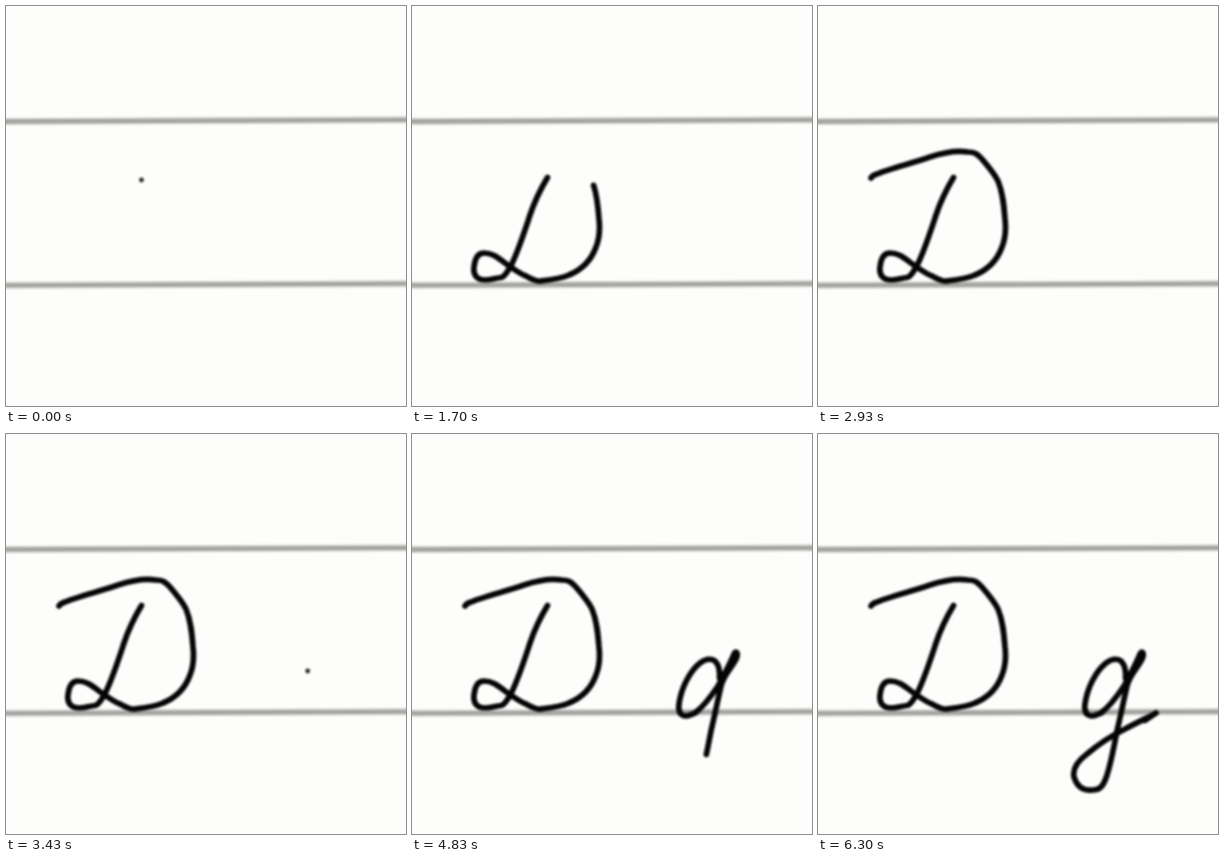
Recreate the animation shown at these times as an HTML page. Size 400 px wide and 400 px high, loop 6330 ms.

```html
<!DOCTYPE html>
<html lang="en">
<head>
<meta charset="utf-8">
<title>Handwriting</title>
<style>
  html, body { margin: 0; width: 100%; height: 100%; overflow: hidden; background: #fdfdfc; }
  svg { display: block; width: 100vw; height: 100vh; }
  path { fill: none; stroke-linecap: round; stroke-linejoin: round; }
  #inks, #rules { filter: blur(.8px); }
  .ink { stroke: #050506; stroke-width: 5.7; }
  .edge { stroke: #d8d8d6; stroke-width: 7; }
  .rule { stroke: #a5a4a1; stroke-width: 4.4; }
</style>
</head>
<body>
<svg viewBox="0 0 400 400">
  <g id="rules"></g>
  <g id="inks"></g>
</svg>
<script>
const LOOP = 6330;
const DOT_TIME = 70;
const $ = id => document.getElementById(id);

function add(parent, tag, attrs) {
  const el = document.createElementNS('http://www.w3.org/2000/svg', tag);
  for (const name in attrs) el.setAttribute(name, attrs[name]);
  parent.appendChild(el);
  return el;
}

for (const y of [115.6, 279.4])
  for (const cls of ['edge', 'rule'])
    add($('rules'), 'path', { class: cls, d: `M-10 ${y}L410 ${y - 1.8}` });

// A small dot marks where the pen lands, then the letter is written in two runs;
// times mark the start, the join and the end.
const letters = [
  {
    dot: [135.5, 174],
    times: [0, 1000, 2240],
    runs: [
      'M135.5 171.5C128 184 122 197 118 209C112 227 104 252 97 263C94 268 92 271 89 271.5' +
      'C84 272 80 274 73 274C65 274 61 269 62 261C63 252 66 247 72 247',
      'C80 247 85 251 93 257C103 264 108 268 114 270C120 273 124 276 129 275' +
      'C138 274 148 273 157 269C169 264 179 255 184 241C188 231 188 222 187 213' +
      'C186 200 185 187 180 175C176 167 169 159 163 152C159 148 157 146 150 146' +
      'C138 144 124 147 112 151C95 157 70 163 59 168C56 169 54 170 53 172'
    ]
  },
  {
    dot: [301.7, 237],
    times: [3400, 4270, 5420],
    runs: [
      'M307.5 244C308 237 307 231 303 227C299 224 293 225 288 229C277 238 269 255 267 270' +
      'C266 277 268 281 273 282C277 282 280 280 283 279',
      'C291 273 298 264 306 252C312 241 318 230 322 220C324 216 326.5 219 324.5 224' +
      'C320 234 312 240 309 252C306 265 303 280 299 297C296 312 293 330 288 344' +
      'C285 352 282 356 275 356C266 357 259 353 256 343C254 333 261 326 269 320' +
      'C282 309 295 301 307 295C318 289 329 284 338 279L327 286.5'
    ]
  }
];

for (const letter of letters) {
  const [cx, cy] = letter.dot;
  letter.dotEl = add($('inks'), 'circle', { cx, cy, r: 2.4, fill: '#2a2a28' });
  letter.ink = add($('inks'), 'path', { class: 'ink', d: letter.runs[0] });
  const join = letter.ink.getTotalLength();
  letter.ink.setAttribute('d', letter.runs.join(''));
  letter.lengths = [0, join, letter.ink.getTotalLength()];
}

function drawnLength({ times, lengths }, t) {
  const i = t < times[1] ? 0 : 1;
  const k = Math.min(1, (t - times[i]) / (times[i + 1] - times[i]));
  return lengths[i] + (lengths[i + 1] - lengths[i]) * k;
}

const show = (el, on) => { el.style.visibility = on ? 'visible' : 'hidden'; };

const origin = performance.now();
function draw() {
  const t = Math.max(0, performance.now() - origin) % LOOP;
  for (const letter of letters) {
    const age = t - letter.times[0];
    show(letter.dotEl, age >= 0 && age < DOT_TIME);
    show(letter.ink, age >= DOT_TIME);
    if (age >= DOT_TIME)
      letter.ink.style.strokeDasharray = `${drawnLength(letter, t)} 2000`;
  }
  requestAnimationFrame(draw);
}
draw();
</script>
</body>
</html>
```
